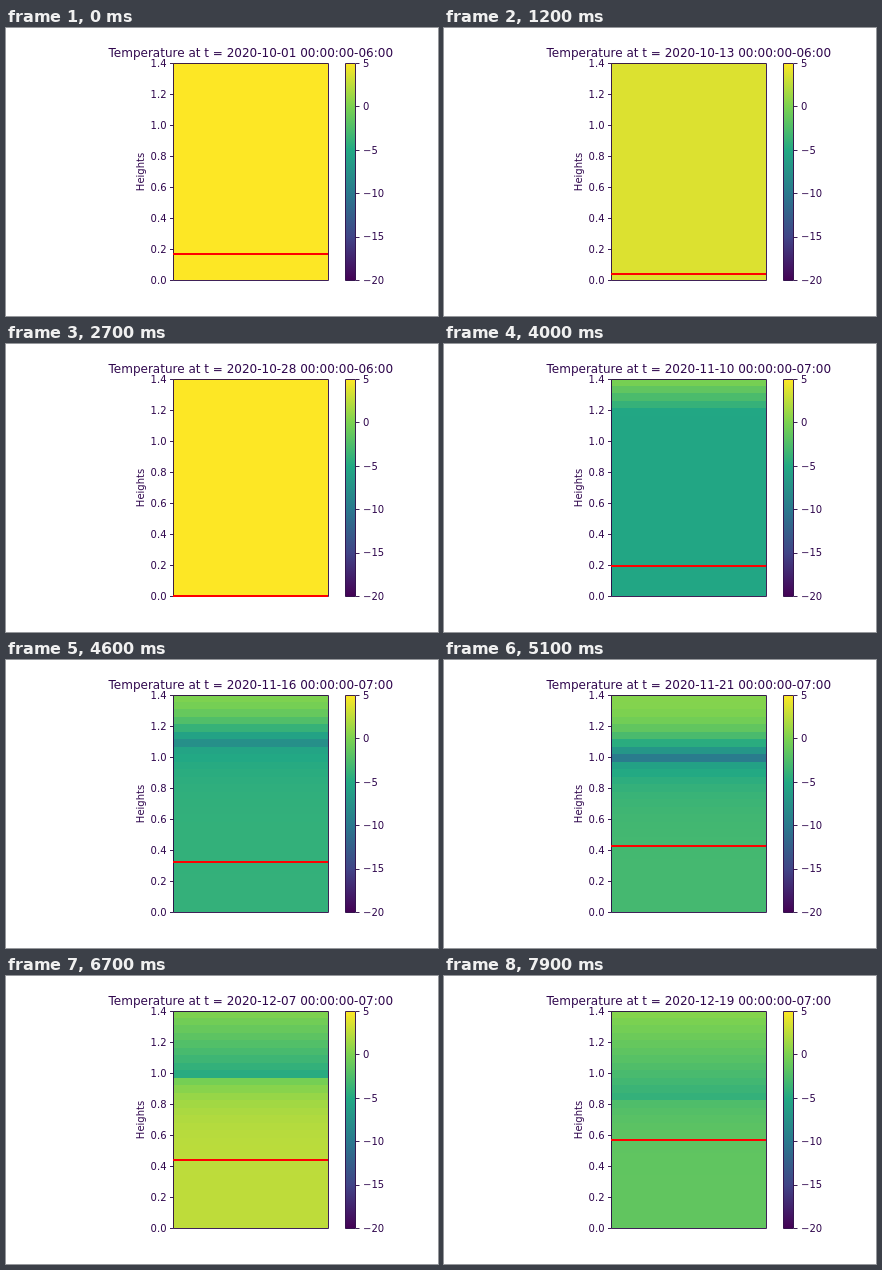
Animation of 432x288 px, one loop 8 s. Source, as an HTML page:

```html
<!DOCTYPE html>
<html lang="en">
<head>
<meta charset="utf-8">
<title>Temperature by height</title>
<style>
  html, body { margin: 0; width: 100%; height: 100%; overflow: hidden; background: #fff; }
  svg { display: block; width: 432px; height: 288px; }
  text { font: 10px "DejaVu Sans", sans-serif; fill: #30084e; }
  #title { font-size: 12px; }
  .axis { fill: none; stroke: #2a0845; stroke-width: .9; }
</style>
</head>
<body>
<svg viewBox="0 0 432 288">
  <defs><linearGradient id="scale" x1="0" y1="1" x2="0" y2="0"></linearGradient></defs>
  <text id="title" x="244.8" y="29" text-anchor="middle"></text>
  <text transform="translate(138 144) rotate(-90)" text-anchor="middle">Heights</text>
  <g id="cells" shape-rendering="crispEdges"></g>
  <rect x="339.5" y="35.5" width="10" height="217" fill="url(#scale)"></rect>
  <g id="ticks"></g>
  <path class="axis" d="M167.5 35.5H322.5V252.5H167.5ZM339.5 35.5H349.5V252.5H339.5Z"></path>
  <path id="depth" stroke="#f00" stroke-width="2"></path>
</svg>
<script>
const FRAME_MS = 100, FRAMES = 80, CELLS = 29;
const LEFT = 167, RIGHT = 322, TOP = 35, BOTTOM = 252, SPAN = BOTTOM - TOP;
const MIN_TEMP = -20, MAX_TEMP = 5;
const DAY_MS = 864e5, START = Date.UTC(2020, 9, 1), DST_END = Date.UTC(2020, 10, 1);

const PALETTE = ['440154', '414487', '2a788e', '22a884', '7ad151', 'fde725'];
const STEPS = PALETTE.length - 1;
const RGB = PALETTE.map(hex => [0, 2, 4].map(i => parseInt(hex.slice(i, i + 2), 16)));

// Red line height, and temperatures at the ground, the coldest cell and the top.
const even = (day, depth, temp) => ({ day, depth, ground: temp, cell: 24, cold: temp, top: temp });
const KEYS = [
  even(0, .17, 5), even(10, .04, 5), even(21, .02, -1.9), even(27, 0, 5),
  { day: 40, depth: .195, ground: -5.2, cell: 24, cold: -5.1, top: -.2 },
  { day: 51, depth: .425, ground: -3, cell: 20, cold: -9.7, top: .4 },
  { day: 67, depth: .438, ground: 2.6, cell: 20, cold: -4.6, top: .1 },
  { day: 79, depth: .567, ground: -1.4, cell: 17, cold: -4, top: .4 }
];

const $ = id => document.getElementById(id);
const lerp = (a, b, t) => a + (b - a) * t;

function add(parent, tag, attrs, text = '') {
  const node = document.createElementNS('http://www.w3.org/2000/svg', tag);
  for (const key in attrs) node.setAttribute(key, attrs[key]);
  node.textContent = text;
  return parent.appendChild(node);
}

function stateAt(day) {
  const next = Math.max(1, KEYS.findIndex(key => key.day >= day));
  const a = KEYS[next - 1], b = KEYS[next], t = (day - a.day) / (b.day - a.day);
  const state = {};
  for (const name in a) state[name] = lerp(a[name], b[name], t);
  state.cell = Math.round(state.cell);
  return state;
}

// Below the coldest cell the chill fades out; above it the air warms towards the top.
function tempAt(i, { ground, cell, cold, top }) {
  if (i < cell) return ground + (cold - ground) * .4 * Math.exp((i + 1 - cell) / 3);
  const bend = 1 + Math.max(0, -6 - cold) / 2.5;
  return lerp(top, cold, (1 - (i - cell) / (CELLS - 1 - cell)) ** bend);
}

function color(temp) {
  const level = Math.min(1, Math.max(0, (temp - MIN_TEMP) / (MAX_TEMP - MIN_TEMP)));
  const i = Math.min(STEPS - 1, Math.floor(level * STEPS));
  return `rgb(${RGB[i].map((c, k) => Math.round(lerp(c, RGB[i + 1][k], level * STEPS - i)))})`;
}

function tick(x, y, label, side) {
  add($('ticks'), 'path', { class: 'axis', d: `M${x} ${Math.round(y) + .5}h${side * 3.5}` });
  add($('ticks'), 'text', {
    x: x + side * 7, y: Math.round(y + 3.8), 'text-anchor': side < 0 ? 'end' : 'start'
  }, label);
}

PALETTE.forEach((hex, i) => add($('scale'), 'stop', { offset: i / STEPS, 'stop-color': '#' + hex }));
for (let i = 0; i < 8; i++) tick(167.5, BOTTOM - i * SPAN / 7, (i / 5).toFixed(1), -1);
for (let i = 0; i < 6; i++) {
  tick(350, TOP + i * SPAN / 5, String(MAX_TEMP - 5 * i).replace('-', '\u2212'), 1);
}

const edge = i => Math.floor(BOTTOM - i * SPAN / CELLS);
const cells = Array.from({ length: CELLS }, (_, i) => add($('cells'), 'rect', {
  x: LEFT, y: edge(i + 1), width: RIGHT - LEFT, height: edge(i) - edge(i + 1)
}));

function draw(day) {
  const date = START + day * DAY_MS;
  const zone = date > DST_END ? '07' : '06';
  $('title').textContent =
    `Temperature at t = ${new Date(date).toISOString().slice(0, 10)} 00:00:00-${zone}:00`;

  const state = stateAt(day);
  cells.forEach((cell, i) => cell.setAttribute('fill', color(tempAt(i, state))));
  const y = Math.round(BOTTOM - state.depth / 1.4 * SPAN);
  $('depth').setAttribute('d', `M${LEFT} ${y}H${RIGHT}`);
}

let shown = -1;
const begin = performance.now();
function play() {
  const day = Math.floor((performance.now() - begin) / FRAME_MS) % FRAMES;
  if (day !== shown) draw(shown = day);
  requestAnimationFrame(play);
}
play();
</script>
</body>
</html>
```
